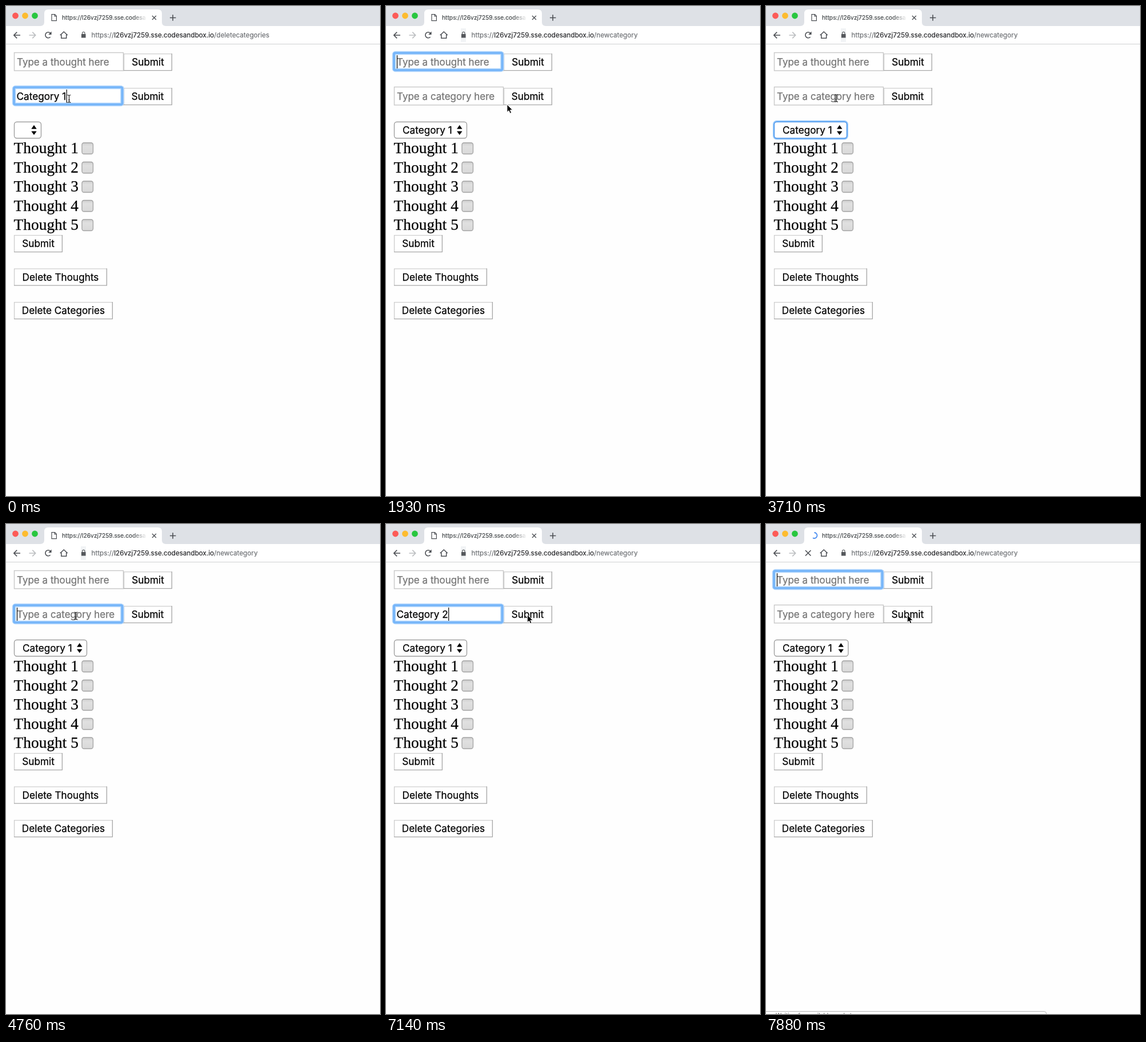
Animation, 655 px wide and 856 px high, one loop 8000 ms. Source, as an HTML page:

```html
<!DOCTYPE html>
<html lang="en">
<head>
<meta charset="utf-8">
<title>Thoughts</title>
<style>
  html, body { margin: 0; width: 100%; height: 100%; overflow: hidden; background: #fefefe; }
  svg { display: block; width: 100%; height: 100%; }
  text {
    font: 17.2px Inter, "Open Sans", sans-serif; white-space: pre;
    fill: currentColor; stroke: currentColor; stroke-width: .25;
  }
  .row { font: 27.4px "Liberation Serif", serif; }
  .mid { text-anchor: middle; }
  .hint { font-size: 17px; color: #757575; }
  .icon { fill: none; stroke: #4c4f54; stroke-width: 1.6; }
  .url { font-size: 11.72px; color: #6a6d71; stroke-width: .15; }
  .host { color: #202124; fill: currentColor; stroke: currentColor; }
  .tab { font-size: 10.3px; color: #3c4043; stroke-width: .15; }
</style>
</head>
<body>
<svg viewBox="0 0 655 856">
  <defs>
    <linearGradient id="box" x2="0" y2="1">
      <stop stop-color="#cfcfcf"/><stop offset=".3" stop-color="#e0e0e0"/><stop offset="1" stop-color="#d9d9d9"/>
    </linearGradient>
    <linearGradient id="fade">
      <stop stop-color="#fff" stop-opacity="0"/><stop offset="1" stop-color="#fff"/>
    </linearGradient>
    <filter id="shadow" x="-20%" y="-60%" width="140%" height="220%">
      <feDropShadow dx="0" dy="2" stdDeviation="2.5" flood-opacity=".4"/>
    </filter>
  </defs>

  <!-- browser window -->
  <path fill="#dee1e6" d="M0 0H655V35H0Z"/>
  <circle cx="16.5" cy="17" r="5.4" fill="#fc5b57"/>
  <circle cx="33.5" cy="17" r="5.4" fill="#fdbc2f"/>
  <circle cx="50.5" cy="17" r="5.4" fill="#28c73f"/>
  <path fill="#fff" d="M0 35H60Q67 35 67 28V13Q67 6 74 6H266Q273 6 273 13V28Q273 35 280 35H655V67H0Z"/>
  <path fill="#cfd0d2" d="M0 66H655V67H0Z"/>
  <path id="doc" class="icon" style="stroke-width:1.2" d="M80 14.6H85.5L88.4 17.5V25.6H80ZM85.2 14.6V18H88.4"/>
  <path id="spinner" fill="none" stroke-width="1.8" d="M0 -5A5 5 0 1 1 -2.5 4.3"/>
  <text class="tab" x="98" y="24">https://l26vzj7259.sse.codesa</text>
  <path fill="url(#fade)" d="M222 10H247V30H222Z"/>
  <path fill="#fff" d="M247 10H254V30H247Z"/>
  <path class="icon" style="stroke-width:1.4" d="M256 17L263 24M263 17L256 24"/>
  <path class="icon" d="M287 20.5H297.5M292.2 15.2V25.8"/>
  <path class="icon" d="M25 51H14M19.2 45.6L13.8 51L19.2 56.4"/>
  <path class="icon" style="stroke:#bcbec1" d="M40.5 51H51.5M46.3 45.6L51.7 51L46.3 56.4"/>
  <g id="reload">
    <path class="icon" d="M77.6 54.2A5 5 0 1 1 77.6 47.3"/>
    <path fill="#4c4f54" d="M79.6 44.6V50H74.2Z"/>
  </g>
  <path id="stop" class="icon" d="M69 46L78.5 55.5M78.5 46L69 55.5"/>
  <path class="icon" style="stroke-width:1.5" d="M94.8 51L101.3 45L107.8 51M96.9 50V56.3H105.7V50"/>
  <path id="lockShade" fill="#f1f3f5" d="M131 39H140V63H131Z"/>
  <path fill="#55585c" d="M132 49H139.6V55.5H132Z"/>
  <path class="icon" style="stroke:#55585c;stroke-width:1.1" d="M133.6 49V47.4A2.2 2.2 0 0 1 138 47.4V49"/>
  <text class="url" x="149.5" y="54.7">https://<tspan class="host">l26vzj7259.sse.codesandbox.io</tspan>/<tspan id="path"></tspan></text>

  <!-- page -->
  <g id="page"></g>
  <g id="select">
    <rect id="selectRing" x="14" y="202" height="29.5" rx="4.5" fill="none" stroke="#8fc4fb" stroke-width="4"/>
    <rect id="selectBox" x="14.5" y="202.5" height="28.5" rx="4.5" fill="#fff" stroke-width="1.4"/>
    <text id="choice" x="29" y="222.5">Category 1</text>
    <path id="arrows" d="M-4.7 -1.8H4.7L0 -8.4ZM-4.7 2.2H4.7L0 8.8Z"/>
  </g>
  <g id="rings"></g>
  <text id="thoughtHint" class="hint" x="19" y="104">Type a thought here</text>
  <text id="categoryHint" class="hint" x="19" y="164">Type a category here</text>
  <text id="category" x="18.5" y="164"></text>
  <text class="mid" x="248" y="164">Submit</text>
  <path id="caret" stroke="#000" stroke-width="1.2" d="M0 0V23"/>
  <g id="menu">
    <path fill="#fff" filter="url(#shadow)" d="M5 204H134V236.5H5Z"/>
    <path id="highlight" fill="#2a86f7" d="M5 207.5H134V233H5Z"/>
    <g id="menuText">
      <path fill="none" stroke="currentColor" stroke-width="1.5" d="M10 220.5L12.3 223.6L16.6 216.7"/>
      <text x="23" y="227">Category 1</text>
    </g>
  </g>
  <g id="status">
    <path fill="#fff" stroke="#b4b4b4" d="M-1 851.5H487Q491 851.5 491 855.5V860H-1Z"/>
    <text class="tab" style="color:#777" x="17" y="862">Waiting for available socket</text>
  </g>

  <path id="beam" fill="none" stroke="#222" stroke-width="1.2"
    d="M-3 -6.5Q0 -6.5 0 -4.5Q0 -6.5 3 -6.5M0 -4.5V4.5M-3 6.5Q0 6.5 0 4.5Q0 6.5 3 6.5M-1.5 2H1.5"/>
  <path id="arrow" stroke="#fff" d="M0 0V13.5L3.1 10.7L5.3 15.6L7.7 14.5L5.5 9.8H9.8Z"/>
</svg>

<script>
const $ = id => document.getElementById(id);
const show = (id, on) => { $(id).style.display = on ? '' : 'none'; };
const set = (id, name, value) => $(id).setAttribute(name, value);
const place = (id, x, y, extra = '') => set(id, 'transform', `translate(${x} ${y}) ${extra}`);

// Static form controls
const LIGHT = '#cfcfcf', DARK = '#a8a8a8';
function button(x, y, w, label, id = '') {
  return `<g id="${id}"><rect x="${x}" y="${y}" width="${w}" height="30" fill="#fff"/>
    <path class="lit" fill="none" stroke="${LIGHT}" stroke-width="1.4" d="M${x + .6} ${y + 30}V${y + .6}H${x + w}"/>
    <path class="dim" fill="none" stroke="${DARK}" stroke-width="1.4" d="M${x} ${y + 29.6}H${x + w - .6}V${y}"/>
    ${label ? `<text class="mid" x="${x + w / 2}" y="${y + 21}">${label}</text>` : ''}</g>`;
}
const field = y =>
  `<rect x="14.5" y="${y + .5}" width="191" height="31.5" fill="#fff" stroke="#c8c8c8" stroke-width="1.4"/>`;
const row = (_, i) => {
  const y = 238.5 + 33.5 * i;
  return `<text class="row" x="13.6" y="${y + 18.5}">Thought ${i + 1}</text>
    <rect x="133" y="${y + .5}" width="19.5" height="19.5" rx="3.5" fill="url(#box)" stroke="#a2a2a2" stroke-width="1.3"/>`;
};
const ring = (id, x, y, w, h) => `<g id="${id}" fill="none">
  <rect x="${x}" y="${y}" width="${w}" height="${h}" rx="2.5" stroke="#b5d8fd" stroke-width="6.5"/>
  <rect x="${x}" y="${y}" width="${w}" height="${h}" rx="2" stroke="#75b5f9" stroke-width="3.6"/></g>`;

$('page').innerHTML = field(81) + field(141) +
  button(206, 83, 85, 'Submit') + button(206, 143, 85, '', 'send') +
  Array.from({ length: 5 }, row).join('') +
  button(14, 400, 85, 'Submit') + button(14, 458.5, 163, 'Delete Thoughts') +
  button(14, 517, 173, 'Delete Categories');
$('rings').innerHTML = ring('thoughtRing', 14, 82, 189.5, 30) +
  ring('categoryRing', 14, 142, 189.5, 30) + ring('sendRing', 205, 141.5, 87.5, 33);

// Each cue changes part of the state at a time in ms
const beam = (x, y) => ({ cursor: 'beam', x, y });
const arrow = (x, y) => ({ cursor: 'arrow', x, y });
const typed = value => ({ value, caret: true });
const press = { focus: 'send', pressed: true, caret: false };
const release = { pressed: false };
const waiting = { load: 'wait', spin: 180 };
const arrived = {
  load: 'busy', spin: -40, path: 'newcategory', value: '', focus: 'thought', caret: true
};
const cues = [
  [0, { ...beam(110.5, 162), path: 'deletecategories', value: 'Category 1', focus: 'category',
        caret: true, select: 47, spin: 0 }],
  [290, beam(113, 162)],
  [440, { ...beam(128, 162), caret: false }],
  [590, beam(158, 162)],
  [740, arrow(206, 164)],
  [890, { ...arrow(222, 163), caret: true }],
  [1030, { ...arrow(224, 163), ...press }],
  [1180, release],
  [1330, waiting],
  [1480, { status: true, spin: 90 }],
  [1630, { ...arrived, select: 127, shade: true }],
  [1780, { spin: 50 }],
  [1930, { ...arrow(212, 172), load: '', status: false }],
  [2070, { ...arrow(170, 196), caret: false }],
  [2220, arrow(122, 216)],
  [2370, { ...arrow(105, 221), focus: 'select' }],
  [2520, { ...arrow(104, 222), menu: 1, lit: true }],
  [2670, arrow(98.7, 223)],
  [2960, { ...arrow(112, 190), lit: false }],
  [3110, arrow(121, 162)],
  [3410, { menu: .4 }],
  [3560, { ...beam(123, 161), menu: 0 }],
  [3860, { ...beam(122.5, 160.5), focus: 'category', caret: true }],
  [4310, { caret: false }],
  [4760, { caret: true }],
  [4910, typed('C')],
  [5060, typed('Ca')],
  [5210, typed('Cate')],
  [5510, typed('Catego')],
  [5650, typed('Categor')],
  [5800, typed('Category')],
  [5950, typed('Category ')],
  [6100, typed('Category 2')],
  [6550, { ...beam(126, 160), caret: false }],
  [6700, beam(150, 159)],
  [6840, beam(190, 158)],
  [6990, { ...arrow(236, 158), caret: true }],
  [7140, arrow(247.5, 158.5)],
  [7290, press],
  [7440, { ...release, ...waiting }],
  [7590, { status: true, shade: false, spin: 90 }],
  [7740, { ...arrived, select: 129.5 }],
  [7880, { spin: 0 }]
];

function draw(s) {
  $('path').textContent = s.path;
  show('lockShade', s.shade);
  show('doc', !s.load);
  show('reload', !s.load);
  show('stop', s.load);
  show('spinner', s.load);
  set('spinner', 'stroke', s.load === 'wait' ? '#8d9095' : '#4a8df0');
  place('spinner', 84.5, 20, `rotate(${s.spin})`);
  show('status', s.status);

  $('category').textContent = s.value;
  show('categoryHint', !s.value);
  for (const name of ['thought', 'category', 'send', 'select']) show(name + 'Ring', s.focus === name);
  $('send').querySelector('.lit').setAttribute('stroke', s.pressed ? '#8d9bab' : LIGHT);
  $('send').querySelector('.dim').setAttribute('stroke', s.pressed ? LIGHT : DARK);

  const inThought = s.focus === 'thought';
  const textWidth = s.value ? $('category').getComputedTextLength() : 0;
  show('caret', s.caret && (inThought || s.focus === 'category'));
  place('caret', 19.5 + (inThought ? 0 : textWidth), inThought ? 86 : 146);

  set('selectBox', 'width', s.select);
  set('selectRing', 'width', s.select + 1);
  set('selectBox', 'stroke', s.focus === 'select' ? '#4e97ea' : '#a0a0a0');
  show('choice', s.select > 50);
  place('arrows', s.select > 50 ? s.select + 1.8 : 49, 216.5);

  show('menu', s.menu);
  $('menu').style.opacity = s.menu || 0;
  show('highlight', s.lit);
  $('menuText').style.color = s.lit ? '#fff' : '#000';

  show('beam', s.cursor === 'beam');
  show('arrow', s.cursor === 'arrow');
  place(s.cursor, s.x, s.y);
}

const LOOP = 8000;
const start = performance.now();
let shown = 0;
function tick() {
  const time = Math.max(0, performance.now() - start) % LOOP;
  const past = cues.filter(([at]) => at <= time);
  if (past.length !== shown) {
    shown = past.length;
    draw(Object.assign({}, ...past.map(([, change]) => change)));
  }
  requestAnimationFrame(tick);
}
tick();
</script>
</body>
</html>
```
